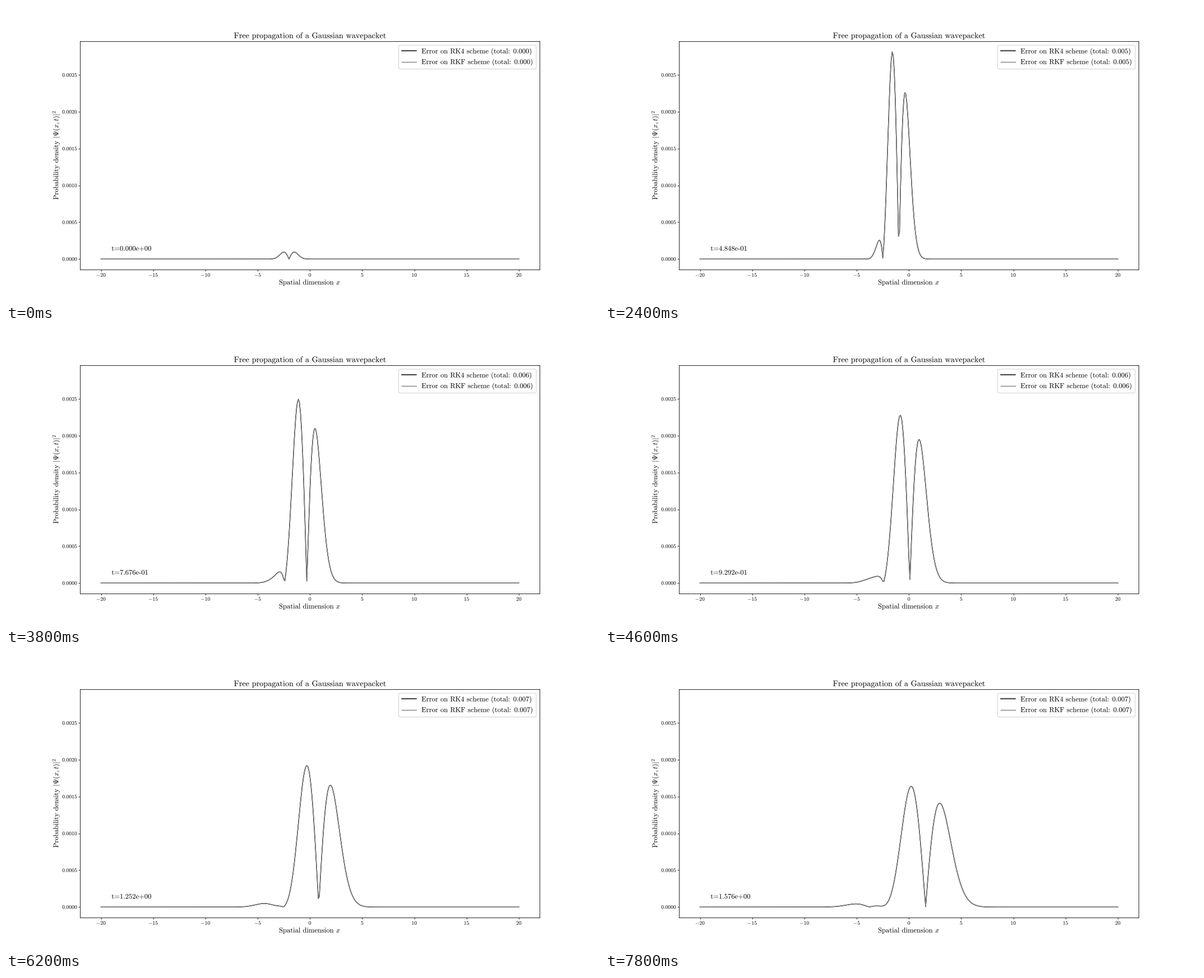
Recreate the animation shown at these times as a matplotlib script. Size 1058 by 529 pixels, loop 8 s.

```python
import numpy as np
import matplotlib
import matplotlib.pyplot as plt
from matplotlib.animation import FuncAnimation
from matplotlib.lines import Line2D
from matplotlib.patches import FancyBboxPatch, PathPatch
from matplotlib.textpath import TextPath
from matplotlib.transforms import Affine2D

W, H, DPI = 1058, 529, 72
FRAMES, INTERVAL = 40, 200
TITLE, LABEL, TICK = 14.2, 12.55, 9.6
GRAY = "#808080"

matplotlib.rcParams["mathtext.fontset"] = "cm"

# Wavepacket on a grid, in units where hbar = m = 1
X0, K0, SIGMA = -2.0, 1.0, 0.5
DT, FRAME_DT = 1e-4, 0.0404
x = np.linspace(-20, 20, 401)
dx = x[1] - x[0]
k = 2 * np.pi * np.fft.fftfreq(x.size, dx)
omega = (1 - np.cos(k * dx)) / dx**2  # second-order finite differences
psi0 = (2 * np.pi * SIGMA**2) ** -0.25 * np.exp(
    -((x - X0) ** 2) / (4 * SIGMA**2) + 1j * K0 * x)
psi0_k = np.fft.fft(psi0)


def exact_density(t):
    var = SIGMA**2 + (t / (2 * SIGMA)) ** 2
    return np.exp(-((x - X0 - K0 * t) ** 2) / (2 * var)) / np.sqrt(2 * np.pi * var)


def error(t):
    # The scheme is one time step ahead of the exact solution.
    psi = np.fft.ifft(psi0_k * np.exp(-1j * omega * (t + DT)))
    return np.abs(np.abs(psi) ** 2 - exact_density(t))


fig = plt.figure(figsize=(W / DPI, H / DPI), dpi=DPI, facecolor="white")
ax = fig.add_axes([0.125, 0.11, 0.775, 0.77])
ax.set_xlim(-22, 22)
PEAK = 0.002814
ax.set_ylim(-0.05 * PEAK, 1.05 * PEAK)
for spine in ax.spines.values():
    spine.set_linewidth(0.85)
ax.tick_params(length=3.2, width=0.8, labelbottom=False, labelleft=False)

# Pixel coordinates measured from the top left corner
PIXELS = Affine2D().scale(1, -1).translate(0, H).scale(1 / DPI) + fig.dpi_scale_trans


def rm(text):
    """Upright text with TeX word spaces, for use inside math mode."""
    out = ""
    for word in text.split():
        out += r"\text{%s}" % word
        out += r"\hspace{%s}" % ("0.506" if word.endswith(":") else "0.38")
    return out[:out.rindex(r"\hspace")]


def glyphs(math, size, ha="left"):
    path = TextPath((0, 0), "$" + math + "$", size=size)
    box = path.get_extents()
    shift = {"left": box.x0, "center": (box.x0 + box.x1) / 2, "right": box.x1}[ha]
    return path.transformed(Affine2D().translate(-shift, 0))


def put(math, px, py, size, ha="left", rotation=0):
    place = Affine2D().rotate_deg(rotation).scale(1, -1).translate(px, py)
    patch = PathPatch(glyphs(math, size, ha), facecolor="black", linewidth=0,
                      transform=place + PIXELS, zorder=5)
    fig.add_artist(patch)
    return patch


left, right, top, bottom = 0.125 * W, 0.9 * W, 0.12 * H, 0.89 * H

xticks = np.arange(-20, 21, 5)
ax.set_xticks(xticks)
for v in xticks:
    put(str(v), left + (v + 22) / 44 * (right - left), 483.8, TICK, "center")

yticks = np.arange(6) * 0.0005
ax.set_yticks(yticks)
for v in yticks:
    py = bottom - (v / PEAK + 0.05) / 1.1 * (bottom - top)
    put(rm(f"{v:.4f}"), 126.4, py + 3.1, TICK, "right")

put(rm("Free propagation of a Gaussian wavepacket"), 542.3, 57.4, TITLE, "center")
put(rm("Spatial dimension") + r"\hspace{0.38}x", 541.6, 497.7, LABEL, "center")
put(rm("Probability density") + r"\hspace{0.38}|\Psi(x,t)|^2",
    93.2, 267, LABEL, "center", rotation=90)

fig.add_artist(FancyBboxPatch(
    (703.1, 72.5), 240.4, 37.6, boxstyle="round,pad=2.5,rounding_size=2.5",
    facecolor="white", edgecolor="0.8", linewidth=0.9, transform=PIXELS, zorder=3))
for py, color, lw in ((80, "black", 1.5), (99.5, GRAY, 1.4)):
    fig.add_artist(Line2D([706, 732], [py, py], color=color, linewidth=lw,
                          transform=PIXELS, zorder=4))


def legend_text(scheme, total):
    return rm(f"Error on {scheme} scheme (total: {total:.3f})")


def time_text(t):
    return rm(f"t={t:.3e}")


SCHEMES = ("RK4", "RKF")
entries = [put(legend_text(name, 0), 741.7, py, LABEL)
           for name, py in zip(SCHEMES, (84.6, 103.7))]
clock = put(time_text(0), 188.6, 437.2, LABEL)
curves = [ax.plot(x, error(0), color=c, linewidth=1.4)[0] for c in ("black", GRAY)]


def update(frame):
    t = frame * FRAME_DT
    err = error(t)
    total = err.sum() * dx
    for curve in curves:
        curve.set_ydata(err)
    for name, entry in zip(SCHEMES, entries):
        entry.set_path(glyphs(legend_text(name, total), LABEL))
    clock.set_path(glyphs(time_text(t), LABEL))
    return [*curves, *entries, clock]


anim = FuncAnimation(fig, update, frames=FRAMES, interval=INTERVAL,
                     repeat=True, repeat_delay=0, blit=False)
plt.show()
```
